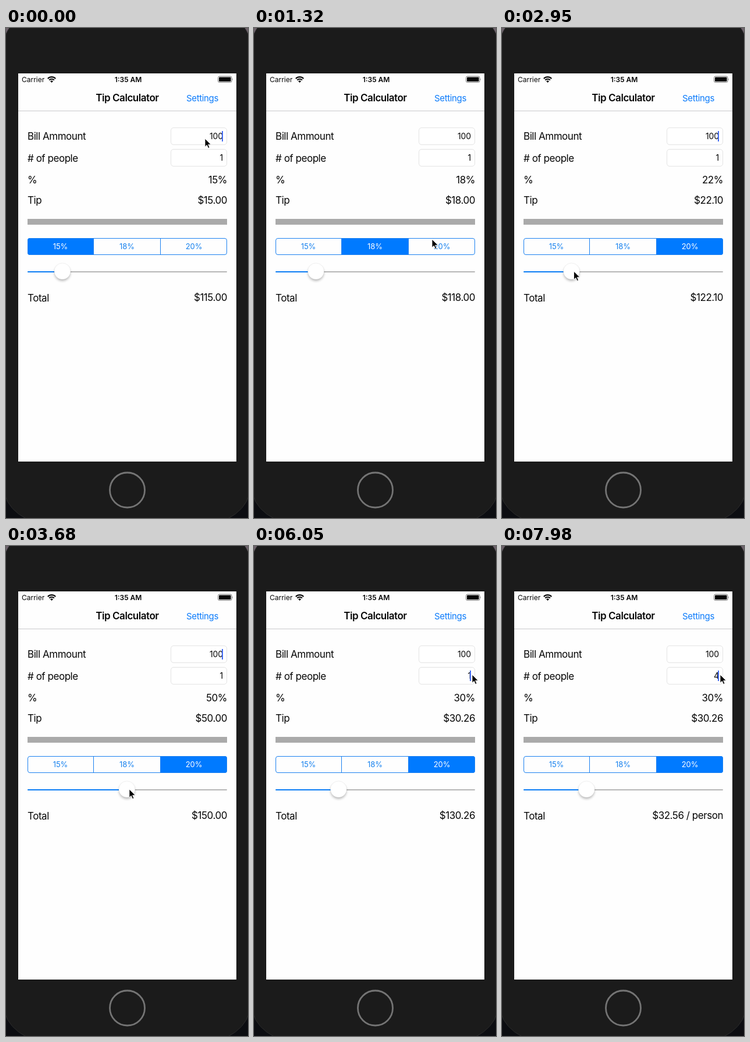
Animation of 416 by 842 pixels, one loop 8 s. Source, as an HTML page:

```html
<!DOCTYPE html>
<html lang="en">
<head>
<meta charset="utf-8">
<title>Tip Calculator</title>
<style>
  html, body { margin: 0; width: 100%; height: 100%; overflow: hidden; background: #0c0d11; }
  svg { display: block; width: 416px; height: 842px; }
  text { font: 400 17px Inter, "Liberation Sans", sans-serif; letter-spacing: -.46px; fill: #050505; }
  .end { text-anchor: end; }
  .mid { text-anchor: middle; }
  .status { font-size: 12px; letter-spacing: 0; }
  .bold { font-weight: 600; }
  .link { font-size: 15px; letter-spacing: -.35px; fill: #0b7bfb; }
  .field { font-size: 14px; letter-spacing: -.1px; }
  .seg { font-size: 13px; letter-spacing: -.08px; }
  .box { fill: #fff; stroke: #e3e3e3; }
</style>
</head>
<body>
<svg viewBox="0 0 416 842">
  <defs>
    <filter id="soft" x="-50%" y="-50%" width="200%" height="200%">
      <feGaussianBlur stdDeviation="2"/>
    </filter>
    <clipPath id="bar"><rect x="37" y="361" width="343" height="29" rx="4"/></clipPath>
  </defs>

  <!-- phone -->
  <rect width="416" height="842" fill="#0c0d11"/>
  <path d="M0 0H8L0 12ZM416 0H408L416 12Z" fill="#6d626b"/>
  <path d="M7 -2Q2 5 -2 15V802Q5 828 36 844H380Q411 828 418 802V15Q414 5 409 -2Z"
        fill="#1b1b1b" stroke="#2b2b2b"/>
  <circle cx="208.5" cy="794" r="30" fill="#1b1b1b" stroke="#747474" stroke-width="2.8"/>
  <rect x="21" y="78" width="375" height="667" fill="#fefefe"/>

  <!-- status and navigation bars -->
  <text class="status" x="27" y="92.7">Carrier</text>
  <g fill="none" stroke="#050505" stroke-width="2.1">
    <path d="M71.8 86.9A9.4 9.4 0 0 1 85.2 86.9"/>
    <path d="M74.2 89.5A6 6 0 0 1 82.8 89.5"/>
  </g>
  <path d="M78.500 94L76 91.300Q78.500 89.200 81 91.300Z" fill="#050505"/>
  <text class="status bold mid" x="210" y="92.600">1:35 AM</text>
  <rect x="364.500" y="83" width="23.500" height="10.500" rx="2.500" fill="none" stroke="#777"/>
  <rect x="366" y="84.500" width="20.500" height="7.500" rx="1" fill="#050505"/>
  <path d="M389 86.500Q390.700 88.200 389 90Z" fill="#777"/>
  <text class="bold mid" x="208.500" y="126">Tip Calculator</text>
  <text class="link" x="310" y="126">Settings</text>
  <rect x="21" y="142" width="375" height="1" fill="#c9c9cb"/>

  <!-- form -->
  <text x="37" y="191.500">Bill Ammount</text>
  <text x="37" y="229.500"># of people</text>
  <text x="37" y="266.500">%</text>
  <text x="37" y="302">Tip</text>
  <text x="37" y="469.500">Total</text>
  <rect class="box" x="283.500" y="171.500" width="96" height="29" rx="4.500"/>
  <rect class="box" x="283.500" y="208.500" width="96" height="29" rx="4.500"/>
  <text class="field end" x="373" y="191">100</text>
  <text class="field end" id="people" x="373" y="228"></text>
  <text class="end" id="percent" x="380" y="266.500"></text>
  <text class="end" id="tip" x="380" y="302"></text>
  <text class="end" id="total" x="380" y="469"></text>
  <rect x="37" y="328" width="343" height="10" fill="#aaa"/>
  <rect id="caret" x="371" width="2" height="18" fill="#426bf2"/>

  <!-- percentage buttons -->
  <g clip-path="url(#bar)" id="fills" fill="#007aff">
    <rect x="37" y="361" width="114" height="29"/>
    <rect x="150" y="361" width="116" height="29"/>
    <rect x="265" y="361" width="115" height="29"/>
  </g>
  <rect x="37.500" y="361.500" width="342" height="28" rx="3.500" fill="none" stroke="#1a80f0"/>
  <path d="M150.500 361V390M265.500 361V390" stroke="#1a80f0"/>
  <g id="labels">
    <text class="seg mid" x="93.500" y="380.300">15%</text>
    <text class="seg mid" x="208" y="380.300">18%</text>
    <text class="seg mid" x="323" y="380.300">20%</text>
  </g>

  <!-- slider -->
  <rect x="37" y="418" width="343" height="2" rx="1" fill="#b6b6b6"/>
  <rect id="track" x="37" y="418" height="2" rx="1" fill="#0a7cf5"/>
  <g id="thumb">
    <circle cy="421" r="13.500" fill="#000" opacity=".28" filter="url(#soft)"/>
    <circle cy="418" r="14" fill="#fff" stroke="#000" stroke-opacity=".1" stroke-width=".6"/>
  </g>

  <path id="pointer" d="M0 0V14.300L3.300 11.200L5.700 16.500L8 15.500L5.700 10.300H10.300Z"
        fill="#000" stroke="#fff" stroke-width=".9"/>
</svg>
<script>
  const LOOP = 8000, STEP = 147.7, LEAD = 18, BILL = 100;
  const $ = id => document.getElementById(id);

  // Rows are [step, ...values], eased linearly between steps.
  const pointerPath = [
    [0, 342, 190], [1, 338, 197], [3, 290, 280], [5, 225, 360], [6, 207, 374],
    [8, 207, 375], [9, 306, 363], [10, 306, 363], [11, 316, 370], [12, 318, 371],
    [13, 317, 330], [14, 313, 263], [15, 268, 310], [16, 190, 372], [17, 130, 408],
    [18, 117, 418], [30, 149, 418], [31, 158, 408], [32, 185, 377], [33, 290, 292],
    [34, 384, 222], [35, 381, 221], [36, 375, 221]
  ];
  const choicePath = [[0, 0], [6, 0], [7, .3], [8, .7], [9, 1], [11, 1], [13, 2]];
  const drag = [22.1, 26.4, 32.7, 40.2, 46.9, 50, 48.2, 43.1, 36.8, 32.1, 30.26];
  const DRAG_START = 20, DRAG_END = 30;

  function along(rows, n) {
    const i = rows.findIndex(r => r[0] > n);
    if (i < 0) return rows[rows.length - 1].slice(1);
    const a = rows[i - 1], b = rows[i], k = (n - a[0]) / (b[0] - a[0]);
    return a.slice(1).map((v, j) => v + (b[j + 1] - v) * k);
  }

  function rate(n) {
    if (n < 7) return 15;
    if (n < 12) return 18;
    if (n < DRAG_START) return 20;
    return drag[Math.min(n - DRAG_START, drag.length - 1)];
  }

  function typed(n) {
    if (n < 43) return "1";
    if (n < 46 || n === 53) return "";
    return n < 53 ? "2" : "4";
  }

  function caretAlpha(n) {
    if (n < 36) return n === 35 || n % 7 === 2 || n % 7 === 3 ? 0 : 1;
    if (n >= 38 && n < 41) return 0;
    if (n >= 49 && n < 53) return [.5, .15, 0, 0][n - 49];
    return 1;
  }

  const money = v => "$" + v.toFixed(2);

  function draw(n) {
    const pct = rate(n), tip = BILL * pct / 100, sum = BILL + tip;
    const guests = n < 46 ? 1 : n < 54 ? 2 : 4;
    $("percent").textContent = Math.floor(pct) + "%";
    $("tip").textContent = money(tip);
    $("total").textContent = guests > 1 ? money(sum / guests) + " / person" : money(sum);
    $("people").textContent = typed(n);

    const x = 49.4 + 3.17 * pct;
    $("thumb").setAttribute("transform", `translate(${x})`);
    $("track").setAttribute("width", x - 37);

    const [choice] = along(choicePath, n);
    [0, 1, 2].forEach(i => {
      const on = Math.max(0, 1 - Math.abs(choice - i));
      $("fills").children[i].style.opacity = on;
      $("labels").children[i].style.fill = on > .5 ? "#fff" : "#1580ee";
    });

    $("caret").setAttribute("y", n < 36 ? 177 : 214);
    $("caret").style.opacity = caretAlpha(n);

    let [px, py] = along(pointerPath, n);
    if (n >= DRAG_START && n <= DRAG_END) px = x + 4;
    $("pointer").setAttribute("transform", `translate(${px} ${py})`);
  }

  const start = performance.now();
  function tick() {
    const t = (performance.now() - start) % LOOP;
    draw(Math.floor((t + LEAD) / STEP));
    requestAnimationFrame(tick);
  }
  tick();
</script>
</body>
</html>
```
